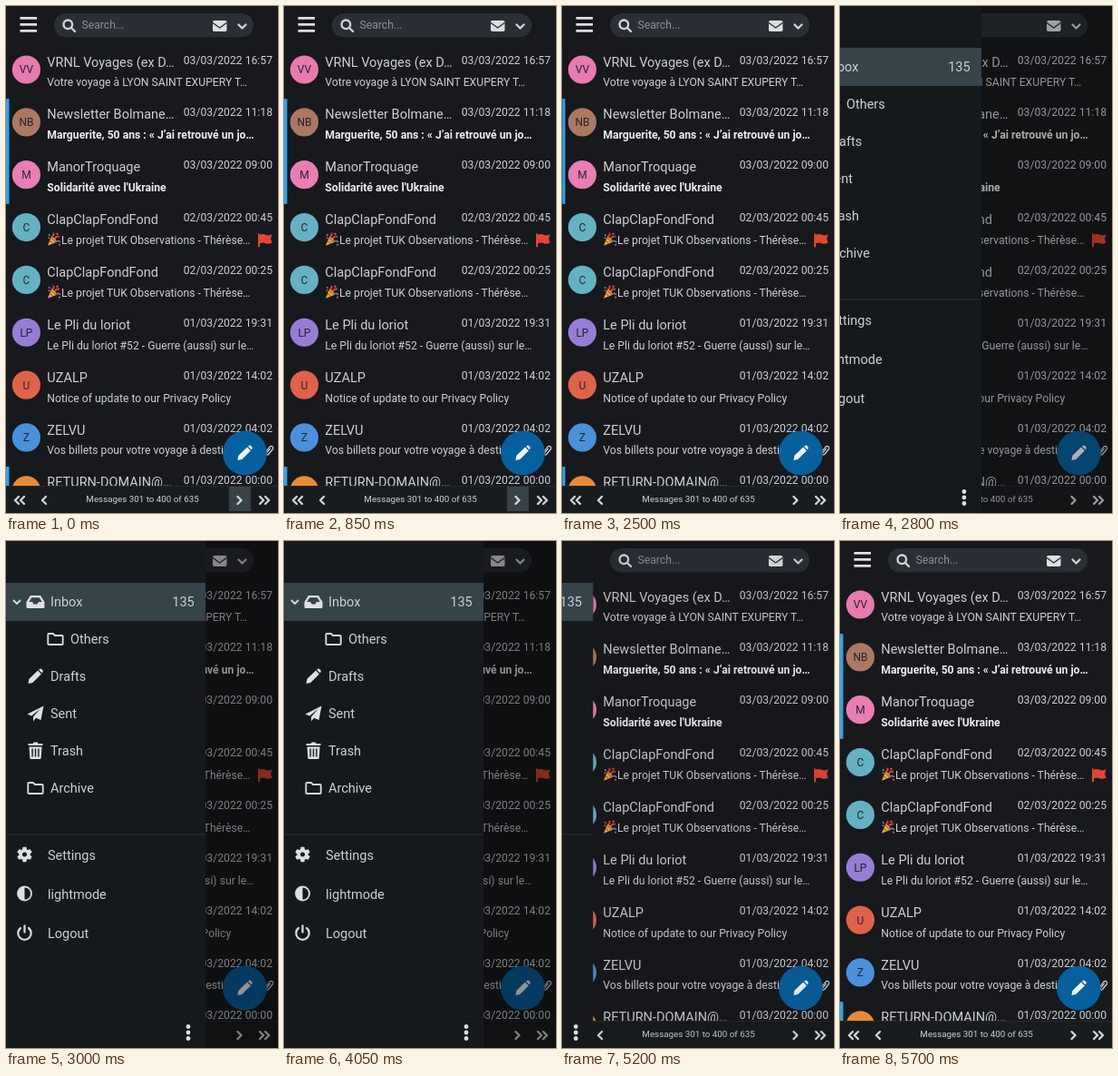
An HTML page for the animation above (5.85 s loop, 300 px wide and 558 px high).

```html
<!DOCTYPE html>
<html lang="fr">
<head>
<meta charset="utf-8">
<title>Mailbox menu</title>
<style>
html, body { margin: 0; width: 100%; height: 100%; overflow: hidden; background: #17191c; }
svg { display: block; width: 100vw; height: 100vh; font-family: Roboto, sans-serif; fill: #cbd0d3; }
.name, .item { font-size: 14.5px; }
.text { font-size: 12.2px; }
.bold { font-weight: 700; fill: #eceeef; }
.initials { font-size: 12px; text-anchor: middle; fill: #24242a; }
.line { fill: none; stroke: #d3d7d9; stroke-width: 1.9; stroke-linecap: round; stroke-linejoin: round; }
.thick { stroke-width: 2.3; }
.thin { stroke-width: 1.2; }
.icon { fill: #dde0e2; }
</style>
</head>
<body>
<svg viewBox="0 0 300 558" xmlns="http://www.w3.org/2000/svg">
  <defs>
    <g id="pencil"><path d="M-8 8l1-5.200L2.600-6.400 6.400-2.600-3.200 7zM3.600-7.300L5-8.300Q6-8.700 6.800-7.900L8-6.600Q8.700-5.700 8-4.800L7.200-3.700z"/></g>
    <g id="folder"><path class="line" d="M-7.200-6h4.600l2 2h7.800q1 0 1 1v8q0 1-1 1h-14.400q-1 0-1-1v-10q0-1 1-1z"/></g>
    <g id="popper">
      <path fill="#eeb23f" d="M0 14L4.200 3.800Q8.500 5 10 10z"/>
      <path fill="none" stroke="#c4622c" stroke-width="1.500" d="M2.300 8.700l3.400 3M3.800 5l5 5"/>
      <path fill="none" stroke="#e0413d" stroke-width="1.800" d="M4.500 3.500q3.500-.5 1.500-3.500M8 6.500q1-3.500 5-2.500"/>
      <path fill="none" stroke="#5b8fd9" stroke-width="1.500" d="M10 9q2-1 4 1M1 1.500l1.500 1.500"/>
      <g fill="#d9574f"><circle cx="10.500" cy="1" r="1.200"/><circle cx="1.500" cy="5.500" r="1"/><circle cx="13" cy="13" r="1.100"/></g>
    </g>
    <clipPath id="listArea"><path d="M0 44h300v484H0z"/></clipPath>
  </defs>
  <rect width="300" height="558" fill="#17191c"/>

  <g id="header">
    <path class="icon" d="M15.500 12h18.500v2.800h-18.500zM15.500 19h18.500v2.800h-18.500zM15.500 26h18.500v2.800h-18.500z"/>
    <rect x="53" y="8" width="220" height="26.500" rx="13" fill="#292f34"/>
    <circle cx="68.300" cy="20.300" r="4.800" class="line thick"/>
    <path class="line thick" d="M72 24l4 4"/>
    <text x="83.500" y="25" class="text" fill="#8c9398">Search...</text>
    <rect x="228" y="16" width="15.500" height="12" rx="1.800" class="icon"/>
    <path d="M228 18.500l7.700 5.500 7.700-5.500" fill="none" stroke="#292f34" stroke-width="1.400"/>
    <path class="line thick" d="M256.500 20.500l4 4 4-4"/>
  </g>

  <g id="list" clip-path="url(#listArea)"></g>

  <g id="footer">
    <rect y="528" width="300" height="30" fill="#191c1f"/>
    <rect y="528" width="300" height="1" fill="#24282c"/>
    <rect id="pressed" x="246" y="529" width="24" height="27" fill="#384248"/>
    <path class="line thick" d="M14 540l-4 4 4 4M20 540l-4 4 4 4M44 540l-4 4 4 4M255.500 540l4 4-4 4M280 540l4 4-4 4M286 540l4 4-4 4"/>
    <text x="150.500" y="546" font-size="9.800" text-anchor="middle">Messages 301 to 400 of 635</text>
  </g>

  <path class="line thin" d="M285.500 492l5-6.500q2-2 3.500-.5 1.300 1.500 0 3l-4.500 5.500q-1.300 1-2 .2-.7-1 .2-2l3.600-4.500"/>
  <circle cx="263.400" cy="492" r="24.400" fill="#07609e"/>
  <use href="#pencil" x="263.400" y="492" fill="#f2f4f5"/>

  <rect id="shade" width="300" height="558" fill="#000"/>

  <g id="menu">
    <rect width="220" height="558" fill="#16191c"/>
    <rect y="46" width="220" height="42" fill="#364349"/>
    <rect y="322.500" width="220" height="1" fill="#2b3135"/>
    <path class="line" d="M8.500 65.500l3.500 3.500 3.500-3.500"/>
    <path class="icon" fill-rule="evenodd" d="M27 60h11l4.500 7v5.500q0 1.500-1.500 1.500H24q-1.500 0-1.500-1.500V67zM28.300 62.300L25.300 67H29l1.500 2.600h4L36 67h3.700l-3-4.700z"/>
    <use href="#folder" x="54.500" y="108"/>
    <use href="#pencil" x="32.500" y="149" class="icon"/>
    <path class="icon" d="M41.500 181.500L38.500 197l-5.500-2.300-3 3.800v-5l8-9-9.800 8-4.700-2z"/>
    <path class="icon" fill-rule="evenodd" d="M24.500 223h5l1-1.500h4l1 1.500h5v2h-16zM25.500 226.500h14l-.8 12q0 1.500-1.500 1.500h-9.400q-1.500 0-1.500-1.500zM28.400 228.500v9h1.400v-9zM31.800 228.500v9h1.400v-9zM35.200 228.500v9h1.400v-9z"/>
    <use href="#folder" x="32.500" y="272"/>
    <g id="gear" transform="translate(20.500 345)"></g>
    <circle cx="20.500" cy="388" r="7.500" class="line"/>
    <path class="icon" d="M20.500 380.500a7.500 7.500 0 0 0 0 15z"/>
    <path class="line thick" d="M16 426a7.200 7.200 0 1 0 9 0M20.500 423.500v7"/>
    <text class="item" x="207.700" y="71.500" text-anchor="end">135</text>
    <g class="icon"><circle cx="201" cy="534.500" r="2.400"/><circle cx="201" cy="541" r="2.400"/><circle cx="201" cy="547.500" r="2.400"/></g>
  </g>
</svg>
<script>
const LOOP = 5850, OPEN = 2488, CLOSE = 4838, SLIDE = 500;
const MENU_WIDTH = 220, ROW_TOP = 44.3, ROW_HEIGHT = 57.85;
const $ = id => document.getElementById(id);

function add(parent, tag, attrs, text) {
  const el = document.createElementNS('http://www.w3.org/2000/svg', tag);
  for (const key in attrs) el.setAttribute(key, attrs[key]);
  if (text) el.textContent = text;
  parent.appendChild(el);
  return el;
}

const mails = [
  { who: 'VRNL Voyages (ex D…', tag: 'VV', color: '#e87ab0', date: '03/03/2022 16:57', text: 'Votre voyage à LYON SAINT EXUPERY T…' },
  { who: 'Newsletter Bolmane…', tag: 'NB', color: '#ab7862', date: '03/03/2022 11:18', text: 'Marguerite, 50 ans : « J’ai retrouvé un jo…', unread: true },
  { who: 'ManorTroquage', tag: 'M', color: '#e87eb4', date: '03/03/2022 09:00', text: "Solidarité avec l'Ukraine", unread: true },
  { who: 'ClapClapFondFond', tag: 'C', color: '#65b1c4', date: '02/03/2022 00:45', text: 'Le projet TUK Observations - Thérèse…', party: true, flag: true },
  { who: 'ClapClapFondFond', tag: 'C', color: '#65b1c4', date: '02/03/2022 00:25', text: 'Le projet TUK Observations - Thérèse…', party: true },
  { who: 'Le Pli du loriot', tag: 'LP', color: '#977dd5', date: '01/03/2022 19:31', text: 'Le Pli du loriot #52 - Guerre (aussi) sur le…' },
  { who: 'UZALP', tag: 'U', color: '#e0624a', date: '01/03/2022 14:02', text: 'Notice of update to our Privacy Policy' },
  { who: 'ZELVU', tag: 'Z', color: '#4a90da', date: '01/03/2022 04:02', text: 'Vos billets pour votre voyage à destin…' },
  { who: 'RETURN-DOMAIN@…', tag: 'R', color: '#e88b38', date: '01/03/2022 00:00', text: '', unread: true }
];

mails.forEach((mail, i) => {
  const row = add($('list'), 'g', { transform: `translate(0 ${ROW_TOP + i * ROW_HEIGHT})` });
  if (mail.unread) add(row, 'rect', { width: 3.5, height: ROW_HEIGHT, fill: '#2ba6ee' });
  add(row, 'circle', { cx: 22.4, cy: 25.7, r: 15.6, fill: mail.color });
  add(row, 'text', { x: 22.4, y: 30.2, class: 'initials' }, mail.tag);
  add(row, 'text', { x: 45.3, y: 22.3, class: 'name' }, mail.who);
  add(row, 'text', { x: 294, y: 19.3, class: 'text', 'text-anchor': 'end' }, mail.date);
  if (mail.party) add(row, 'use', { href: '#popper', x: 46, y: 32 });
  add(row, 'text', { x: mail.party ? 61 : 45.3, y: 44.2, class: mail.unread ? 'text bold' : 'text' }, mail.text);
  if (mail.flag) add(row, 'path', { d: 'M278 32.500h1.500v1.500q3.500-1.500 7 0t7-.5l-1.500 4.800 1.500 4.700q-3.500 1.500-7 .3t-6.500.2v4H278z', fill: '#e64432' });
});

const entries = [
  [49, 71.5, 'Inbox'], [71, 112.7, 'Others'], [49, 153.7, 'Drafts'], [49, 194.7, 'Sent'],
  [49, 235.7, 'Trash'], [49, 276.7, 'Archive'], [46, 350.5, 'Settings'],
  [46, 394, 'lightmode'], [46, 437, 'Logout']
];
for (const [x, y, label] of entries) add($('menu'), 'text', { x, y, class: 'item' }, label);

for (let a = 0; a < 360; a += 60)
  add($('gear'), 'rect', { x: -2.2, y: -8.3, width: 4.4, height: 5, rx: 0.8, class: 'icon', transform: `rotate(${a})` });
add($('gear'), 'circle', { r: 4.4, fill: 'none', stroke: '#dde0e2', 'stroke-width': 3.6 });

// cubic-bezier(.42, 0, .58, 1)
function easeInOut(x) {
  if (x <= 0) return 0;
  if (x >= 1) return 1;
  let low = 0, high = 1, s = 0.5;
  for (let i = 0; i < 24; i++) {
    s = (low + high) / 2;
    const u = 1 - s;
    if (1.26 * u * u * s + 1.74 * u * s * s + s * s * s < x) low = s;
    else high = s;
  }
  return s * s * (3 - 2 * s);
}

function draw(t) {
  const shown = easeInOut((t - OPEN) / SLIDE) - easeInOut((t - CLOSE) / SLIDE);
  $('menu').setAttribute('transform', `translate(${(shown - 1) * MENU_WIDTH} 0)`);
  $('menu').setAttribute('visibility', shown > 0 ? 'visible' : 'hidden');
  $('shade').setAttribute('opacity', 0.4 * shown);
  $('pressed').setAttribute('visibility', t < OPEN ? 'visible' : 'hidden');
}

const start = performance.now();
function tick() {
  draw((performance.now() - start) % LOOP);
  requestAnimationFrame(tick);
}
draw(0);
requestAnimationFrame(tick);
</script>
</body>
</html>
```
